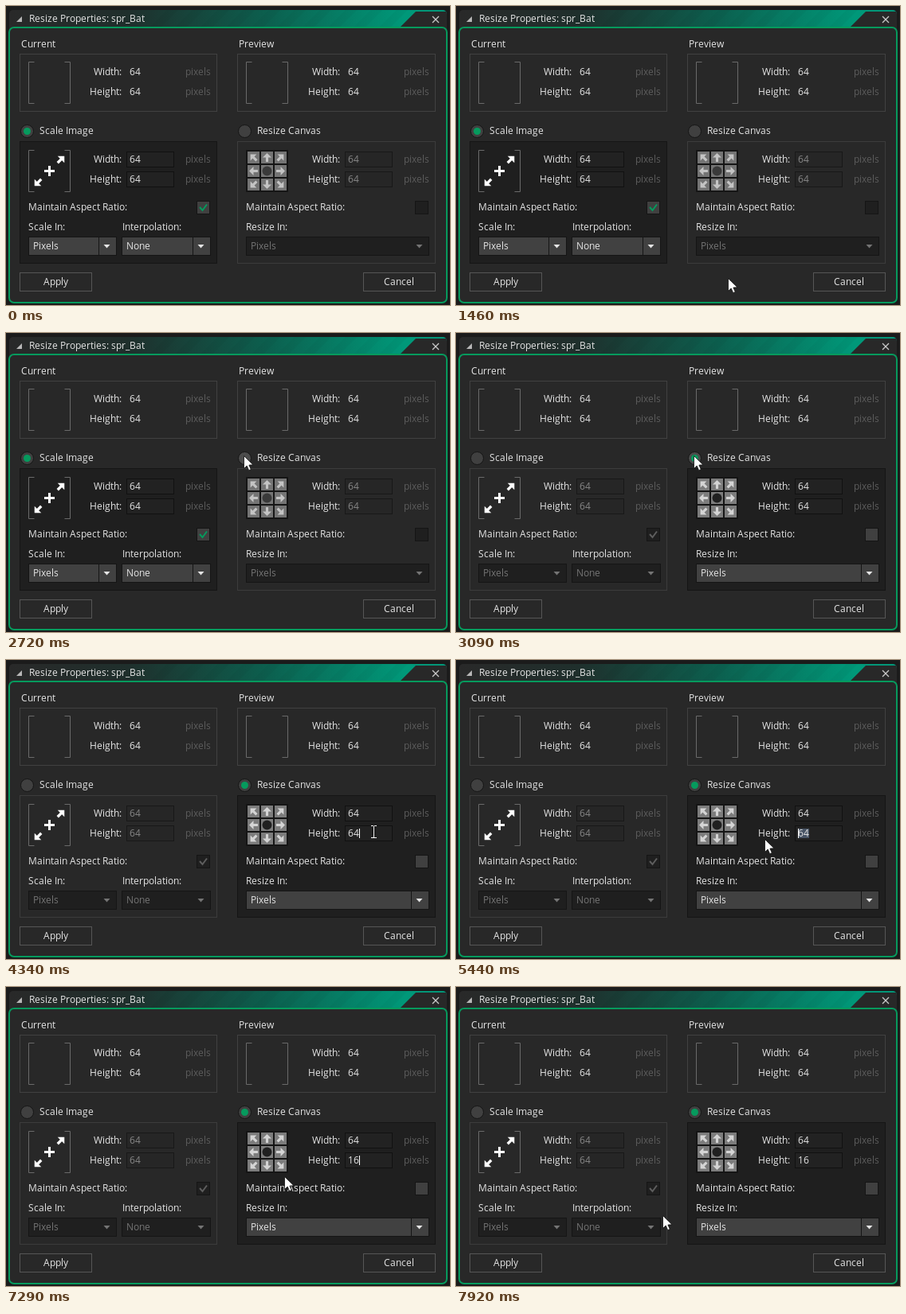
These frames come from a looping animation (557x376 px, 8 s). An HTML page with a canvas:

```html
<!DOCTYPE html>
<html lang="en">
<head>
<meta charset="utf-8">
<title>Resize Properties</title>
<style>
html, body { margin: 0; width: 100%; height: 100%; overflow: hidden; background: #1b1b1b; }
canvas { display: block; }
</style>
</head>
<body>
<canvas id="stage" width="557" height="376"></canvas>
<script>
const LOOP = 8000;
const FONT = '12px "Open Sans", "Noto Sans", sans-serif';
const LIGHT = '#e4e4e4', DIM = '#868686', FAINT = '#5c5c5c';
const GREEN = '#069a5d', PANEL = '#282828', DARK = '#151515';
// Outer box (x, w) and left edge of the fields inside
const LEFT = { x: 17, w: 248, inner: 17 }, RIGHT = { x: 290, w: 249, inner: 291 };
const ctx = document.getElementById('stage').getContext('2d');

// Pointer moves: first step, last step, number of steps, end point, curve of y
const moves = [
  [1370, 2090, 9, 315, 222, 1],
  [2180, 2720, 7, 298, 154, 1],
  [3460, 4060, 8, 461, 216, 1],
  [4430, 4790, 5, 387, 225, 1],
  [7110, 7920, 10, 259, 287, 1.3]
];

function pointerAt(t) {
  let x = 348, y = 376;
  for (const [start, end, steps, toX, toY, curve] of moves) {
    if (t < start) break;
    const step = (end - start) / (steps - 1);
    const p = Math.min(1, (Math.floor((t - start) / step + 1e-6) + 1) / steps);
    x += (toX - x) * p;
    y += (toY - y) * p ** curve;
  }
  return [Math.round(x), Math.round(y)];
}

function rect(x, y, w, h, color) {
  ctx.fillStyle = color;
  ctx.fillRect(x, y, w, h);
}

function box(x, y, w, h, fill, edge) {
  rect(x, y, w, h, edge);
  rect(x + 1, y + 1, w - 2, h - 2, fill);
}

function poly(points, fill) {
  ctx.beginPath();
  for (let i = 0; i < points.length; i += 2) ctx.lineTo(points[i], points[i + 1]);
  ctx.closePath();
  ctx.fillStyle = fill;
  ctx.fill();
}

function line(points, color, width = 1) {
  ctx.beginPath();
  for (let i = 0; i < points.length; i += 2) ctx.lineTo(points[i], points[i + 1]);
  ctx.strokeStyle = color;
  ctx.lineWidth = width;
  ctx.stroke();
}

function disc(x, y, r, fill, edge) {
  ctx.beginPath();
  ctx.arc(x, y, r, 0, 7);
  ctx.fillStyle = fill;
  ctx.fill();
  if (edge) {
    ctx.strokeStyle = edge;
    ctx.lineWidth = 1;
    ctx.stroke();
  }
}

// Every glyph advances by whole pixels; align: 0 left, .5 centre, 1 right
function text(str, x, y, color = LIGHT, align = 0) {
  ctx.font = FONT;
  ctx.fillStyle = color;
  const advances = [...str].map(c => Math.round(ctx.measureText(c).width));
  x -= Math.floor(align * advances.reduce((a, b) => a + b, 0));
  [...str].forEach((c, i) => {
    ctx.fillText(c, x, y);
    x += advances[i];
  });
}

function brackets(x, y) {
  for (const [edge, dir] of [[x + .5, 1], [x + 52.5, -1]])
    line([edge + dir * 7, y + .5, edge, y + .5, edge, y + 52.5, edge + dir * 7, y + 52.5], '#6a6a6a');
}

function sizeRow(x, y, name, value, color) {
  text(name, x + 128, y, LIGHT, 1);
  text(value, x + 138, y, color);
  text('pixels', x + 240, y, FAINT, 1);
}

function frame() {
  rect(0, 0, 557, 376, '#1b1b1b');

  // Title bar
  ctx.save();
  ctx.beginPath();
  ctx.roundRect(4, 5, 549, 30, 5);
  ctx.clip();
  const bar = ctx.createLinearGradient(4, 0, 500, 0);
  bar.addColorStop(0, '#292929');
  bar.addColorStop(.3, '#1f2f2c');
  bar.addColorStop(.65, '#0c5f4e');
  bar.addColorStop(1, '#009879');
  rect(4, 5, 549, 30, bar);
  for (let x = 180; x < 500; x += 32)
    poly([x, 27, x + 22, 5, x + 36, 5, x + 14, 27], 'rgba(0,0,0,.03)');
  poly([494, 27, 514, 7, 553, 7, 553, 35, 494, 35], PANEL);
  ctx.restore();
  poly([20, 13, 20, 20, 13, 20], '#b8b8b8');
  text('Resize Properties: spr_Bat', 29, 20);
  line([535, 13, 543, 21], '#c8c8c8', 1.2);
  line([543, 13, 535, 21], '#c8c8c8', 1.2);

  // Window body
  ctx.beginPath();
  ctx.roundRect(4, 27, 549, 346, 6);
  ctx.fillStyle = PANEL;
  ctx.fill();
  ctx.strokeStyle = GREEN;
  ctx.lineWidth = 2;
  ctx.stroke();

  for (const [{ x, w, inner }, name] of [[LEFT, 'Current'], [RIGHT, 'Preview']]) {
    text(name, x + 2, 52);
    box(x, 60, w, 73, PANEL, '#414141');
    brackets(x + 11, 70);
    sizeRow(inner, 87, 'Width:', '64', LIGHT);
    sizeRow(inner, 112, 'Height:', '64', LIGHT);
  }
  for (const [x, name] of [[17, 'Apply'], [448, 'Cancel']]) {
    box(x, 335, 91, 24, PANEL, '#565656');
    text(name, x + 45, 351, LIGHT, .5);
  }
}

function radio(x, on, hover) {
  disc(x, 157.5, 8, hover ? '#4c4c4c' : '#404040', DARK);
  if (on) disc(x, 157.5, 4.5, GREEN);
}

function select(x, w, value, active) {
  box(x, 290, w, 24, active ? '#414141' : '#1f1f1f', DARK);
  if (active) rect(x + w - 23, 291, 1, 22, DARK);
  text(value, x + 6, 306, active ? LIGHT : '#747474');
  const mid = x + w - 12.5;
  poly([mid - 4, 300, mid + 4, 300, mid, 304.5], active ? LIGHT : '#747474');
}

function group({ x, w, inner }, active, name, hover) {
  radio(x + 9.5, active, hover);
  text(name, x + 25, 161);
  box(x, 170, w, 154, active ? '#1f1f1f' : PANEL, active ? DARK : '#3c3c3c');
  for (const y of [183, 208])
    box(inner + 134, y, 60, 20, active ? '#222222' : '#262626', active ? '#111111' : '#181818');
  text('Maintain Aspect Ratio:', x + 11, 257);
  box(inner + 222, 245, 17, 17, active ? '#404040' : '#1f1f1f', DARK);
}

function arrow(x, y, angle, size, color) {
  ctx.save();
  ctx.translate(x, y);
  ctx.rotate(angle);
  poly([size, 0, 0, -size, 0, size], color);
  rect(-size, -size * .28, size + .5, size * .56, color);
  ctx.restore();
}

function scaleGroup(active) {
  group(LEFT, active, 'Scale Image');
  const color = active ? LIGHT : DIM;
  brackets(28, 181);
  rect(48, 206, 13, 3, '#fff');
  rect(53, 201, 3, 13, '#fff');
  arrow(69, 193, -Math.PI / 4, 6, '#fff');
  arrow(40, 222, Math.PI * .75, 6, '#fff');
  sizeRow(LEFT.inner, 197, 'Width:', '64', color);
  sizeRow(LEFT.inner, 222, 'Height:', '64', color);
  line([243, 253, 246.5, 257, 252, 249.5], active ? GREEN : '#5e5e5e', 2);
  text('Scale In:', 28, 282);
  text('Interpolation:', 146, 282);
  select(28, 111, 'Pixels', active);
  select(145, 112, 'None', active);
}

function canvasGroup(active, hover, height, selected) {
  group(RIGHT, active, 'Resize Canvas', hover);
  rect(301, 181, 53, 53, DARK);
  for (let row = -1; row < 2; row++) for (let col = -1; col < 2; col++) {
    const x = 327.5 + col * 17, y = 207.5 + row * 17;
    rect(x - 7.5, y - 7.5, 15, 15, active ? '#7c7c7c' : '#747474');
    if (row || col) arrow(x, y, Math.atan2(row, col), 5.5, active ? '#d4d4d4' : '#c4c4c4');
    else disc(x, y, 6, active ? '#202020' : '#3a3a3a');
  }
  const color = active ? LIGHT : DIM;
  sizeRow(RIGHT.inner, 197, 'Width:', '64', color);
  if (selected) rect(443 - 7 * selected, 212, 7 * selected, 12, '#485465');
  sizeRow(RIGHT.inner, 222, 'Height:', height, color);
  text('Resize In:', 301, 282);
  select(301, 230, 'Pixels', active);
}

function pointer(x, y, beam) {
  if (beam) {
    rect(x - 1, y - 7, 3, 15, '#111');
    rect(x, y - 7, 1, 15, '#fff');
    for (const edge of [y - 8, y + 7]) {
      rect(x - 3, edge, 3, 1, '#fff');
      rect(x + 1, edge, 3, 1, '#fff');
    }
    return;
  }
  ctx.save();
  ctx.translate(x + .5, y + .5);
  poly([0, 0, 0, 16, 3.7, 12.6, 6.2, 18.2, 8.8, 17, 6.4, 11.6, 11.5, 11.3], '#fff');
  ctx.strokeStyle = '#111';
  ctx.lineWidth = .8;
  ctx.stroke();
  ctx.restore();
}

function draw(t) {
  const [x, y] = pointerAt(t);
  const canvasMode = t >= 3090;
  const overRadio = t >= 1370 && Math.hypot(x - 299.5, y - 157.5) < 9;
  const dragging = t >= 4340 && t < 5810;
  const selected = !dragging || x > 439 ? 0 : x > 432 ? 1 : 2;
  const height = t < 5810 ? '64' : t < 6270 ? '1' : '16';
  const caretOn = t >= 4340 && !(t >= 4970 && t < 5440) && !(t >= 6830 && t < 7290) && t < 7830;

  frame();
  scaleGroup(!canvasMode);
  canvasGroup(canvasMode, overRadio, height, selected);
  if (caretOn) rect(429 + 7 * (height.length - selected), 212, 1, 12, '#fff');
  if (t >= 1370) pointer(x, y, canvasMode && x > 425 && x < 485 && y > 183 && y < 228);
}

const began = performance.now();
function tick() {
  draw((performance.now() - began) % LOOP);
  requestAnimationFrame(tick);
}
tick();
</script>
</body>
</html>
```
